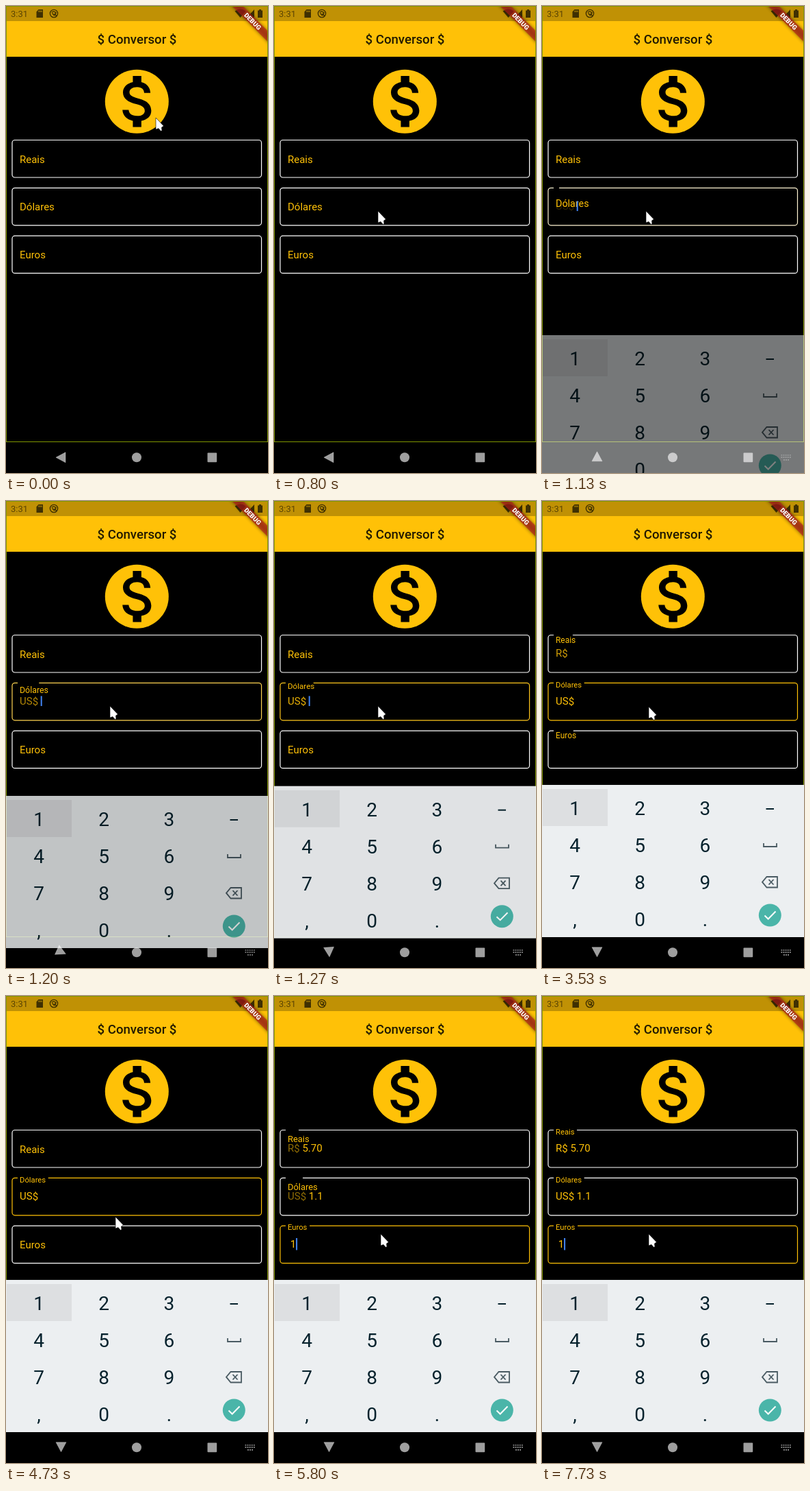
Animation, 383 px wide and 681 px high, one loop 8 s. Source, as an HTML page:

```html
<!DOCTYPE html>
<html lang="pt">
<head>
<meta charset="utf-8">
<title>Conversor</title>
<style>
  html, body { margin: 0; width: 100%; height: 100%; overflow: hidden; background: #000; }
  svg { display: block; width: 100%; height: 100%; font-family: Roboto, Inter, sans-serif; }
  text { white-space: pre; }
  .keys text { font-size: 28px; text-anchor: middle; fill: #06222d; }
</style>
</head>
<body>
<svg viewBox="0 0 383 681">
  <rect width="383" height="681"/>
  <rect width="383" height="74" fill="#ffc107"/>
  <rect width="383" height="22" fill="#c09105"/>

  <g fill="#5a4404">
    <text x="7" y="16" font-size="13">3:31</text>
    <path fill="#3f3002" d="M47.5 5H54V17H44.500V8.500Z"/>
    <path stroke="#c09105" d="M48 6.500V9M50 6.500V9M52 6.500V9"/>
    <circle cx="70" cy="11" r="5.600" fill="none" stroke="#3f3002" stroke-width="1.400"/>
    <path fill="none" stroke="#3f3002" stroke-width="1.500" d="M67 9.500Q70 6.500 73 10L70.500 13.500 67.500 10.500M71 11L74 15"/>
    <g fill="#3f3002">
      <path d="M334.500 7.500Q342.500 1.500 350.500 7.500L342.500 17Z"/>
      <path d="M363 5V17H352Z"/>
      <path d="M368 6.500H370V5H373V6.500H375V17H368Z"/>
    </g>
  </g>

  <text x="191.500" y="55" font-size="18.600" font-weight="500" text-anchor="middle" fill="#211900">$ Conversor $</text>

  <circle cx="191.300" cy="139.200" r="46.500" fill="#ffc107"/>
  <path transform="translate(135.500 83.400) scale(4.650)" d="M13.410 18.090V20h-2.670v-1.930c-1.710-.36-3.160-1.460-3.270-3.400h1.960c.1 1.050.82 1.870 2.650 1.870 1.960 0 2.400-.98 2.400-1.590 0-.83-.44-1.610-2.670-2.140-2.480-.6-4.180-1.620-4.180-3.670 0-1.720 1.390-2.840 3.110-3.210V4h2.670v1.950c1.860.45 2.790 1.860 2.850 3.390H14.300c-.05-1.110-.64-1.870-2.220-1.870-1.500 0-2.400.68-2.400 1.640 0 .84.65 1.390 2.670 1.910s4.180 1.390 4.180 3.910c-.01 1.830-1.380 2.830-3.120 3.160z"/>

  <g id="fields"></g>
  <rect id="caret" width="2" fill="#4285f4"/>

  <defs><filter id="blur" x="-20%" y="-80%" width="140%" height="260%"><feGaussianBlur stdDeviation="2.500"/></filter></defs>
  <g transform="translate(383 0) rotate(45)">
    <rect x="-40" y="26" width="80" height="11.200" opacity=".5" filter="url(#blur)"/>
    <rect x="-40" y="26" width="80" height="11.200" fill="#b71c1c" fill-opacity=".63"/>
    <text y="35" font-size="9.500" font-weight="900" text-anchor="middle" fill="#fff">DEBUG</text>
  </g>
  <rect x=".5" y=".5" width="382" height="635" fill="none" stroke="#7f9600"/>

  <g id="keyboard" class="keys">
    <rect y="414" width="383" height="222" fill="#eceff1"/>
    <rect x="1" y="420" width="95" height="54" fill="#dddfe1"/>
    <g id="digits"></g>
    <path d="M327.500 449H339" stroke="#06222d" stroke-width="2"/>
    <g fill="none" stroke="#4a5b63" stroke-width="1.800">
      <path d="M324 499V504H343V499"/>
      <path d="M328.500 548H344V563.500H328.500L322 555.700Z"/>
      <path d="M331.500 552L338.500 559.500M338.500 552L331.500 559.500"/>
    </g>
    <circle cx="333.300" cy="604" r="16.500" fill="#4ab5a9"/>
    <path d="M325.500 604.500L330.700 609.500 341.500 598.500" fill="none" stroke="#fff" stroke-width="2"/>
  </g>

  <g fill="#fff" fill-opacity=".62">
    <path id="back" stroke="#fff" stroke-opacity=".3" stroke-linejoin="round" d="M-7.500 0L6.500-7.500V7.500Z"/>
    <circle cx="191" cy="658.300" r="7"/>
    <rect x="294.500" y="651.500" width="13.700" height="13.700" rx="1"/>
    <path id="imeIcon" fill="none" stroke="#fff" stroke-opacity=".62" stroke-width="1.700" stroke-dasharray="1.800 1.300" d="M349.500 655H365M349.500 658.200H365M353 661.800H362"/>
  </g>

  <path id="pointer" fill="#fff" stroke="#000" stroke-width=".6" d="M0 0V17L4 15.500 7.500 19.500 9 18.500 8.500 14 11.500 12Z"/>
</svg>

<script>
const LOOP = 8000, RATE = 15;
const NS = "http://www.w3.org/2000/svg";
const byId = id => document.getElementById(id);
const mix = (a, b, p) => a + (b - a) * p;

function add(parent, tag, attrs = {}, text = "") {
  const node = document.createElementNS(NS, tag);
  set(node, attrs);
  node.textContent = text;
  return parent.appendChild(node);
}
function set(node, attrs) {
  for (const key in attrs) node.setAttribute(key, attrs[key]);
}

// Moments in ticks of 1/15 s
const FOCUS_USD = 17, TYPE_USD = 30, CLEAR_USD = 53, FOCUS_EUR = 78, TYPE_EUR = 86;
const CARET_ON = [[17, 24], [30, 37], [44, 52], [60, 67], [78, 85], [86, 93], [101, 109], [116, 120]];
const POINTER = [[2, 219, 163], [12, 152, 299], [41, 152, 299], [42, 154, 299], [43, 154, 299], [44, 156, 300],
                 [69, 156, 300], [70, 158, 309], [71, 160, 322], [75, 156, 347]];
const FOCUS_EASE = [.18, .7, .91, 1];
const TYPE_EASE = [.06, .56, .88, 1];

const ramp = (tick, start, steps) => tick < start ? 0 : steps[Math.min(tick - start, steps.length - 1)];

function makeField(name, prefix, top, labelWidth) {
  const group = add(byId("fields"), "g");
  const border = add(group, "path", { fill: "none", "stroke-width": 1.2 });
  const label = add(group, "text", { x: 20, fill: "#ffc107" }, name);
  const line = add(group, "text", { x: 20, y: top + 31.5, "font-size": 15, fill: "#ffc107" });
  const lead = add(line, "tspan", {}, prefix);
  const value = add(line, "tspan");
  return (lift, focus, text) => {
    const gapEnd = 17 + lift * (labelWidth + 6.5);
    set(border, {
      d: `M${gapEnd} ${top}H369.500a4 4 0 0 1 4 4v46.500a4 4 0 0 1-4 4H13a4 4 0 0 1-4-4V${top + 4}a4 4 0 0 1 4-4H17`,
      stroke: `rgb(255,${mix(255, 193, focus)},${mix(255, 7, focus)})`
    });
    set(label, { y: top + mix(33, 6.2, lift), "font-size": mix(15, 11.25, lift) });
    set(lead, { "fill-opacity": lift });
    value.textContent = text;
  };
}

const reais = makeField("Reais", "R$ ", 195.5, 27.5);
const dolares = makeField("Dólares", "US$ ", 265.3, 38.2);
const euros = makeField("Euros", " ", 335.2, 28.6);

["123", "456", "789", ",0."].forEach((row, r) =>
  [...row].forEach((key, c) => add(byId("digits"), "text", { x: 48 + c * 95.2, y: 458 + r * 54 }, key)));

function pointerAt(tick) {
  const next = POINTER.findIndex(p => p[0] > tick);
  if (next < 0) return POINTER[POINTER.length - 1].slice(1);
  if (next === 0) return POINTER[0].slice(1);
  const [t0, x0, y0] = POINTER[next - 1], [t1, x1, y1] = POINTER[next];
  const u = (tick - t0) / (t1 - t0), p = u * u * (3 - 2 * u);
  return [mix(x0, x1, p), mix(y0, y1, p)];
}

function drawFields(tick) {
  const usdTyped = tick >= TYPE_USD && tick < CLEAR_USD;
  const eurTyped = tick >= TYPE_EUR;
  const usdFocus = ramp(tick, FOCUS_USD, FOCUS_EASE) - ramp(tick, FOCUS_EUR, FOCUS_EASE);
  const eurFocus = ramp(tick, FOCUS_EUR, FOCUS_EASE);
  const first = ramp(tick, TYPE_USD, TYPE_EASE) - ramp(tick, CLEAR_USD, FOCUS_EASE);
  const second = ramp(tick, TYPE_EUR, TYPE_EASE);

  reais(first + second, 0, usdTyped ? "5.11" : eurTyped ? "5.70" : "");
  dolares(usdFocus + second, usdFocus, usdTyped ? "1" : eurTyped ? "1.1" : "");
  euros(first + eurFocus, eurFocus, usdTyped ? "0.90" : eurTyped ? "1" : "");

  const inEuros = tick >= FOCUS_EUR, typed = usdTyped || eurTyped;
  set(byId("caret"), {
    x: (inEuros ? 23.7 : 50.7) + (typed ? 8.4 : 0),
    y: (inEuros ? 353 : 283.2) + (typed ? 0 : 1.2),
    height: typed ? 17.5 : 14.6,
    visibility: CARET_ON.some(([a, b]) => tick >= a && tick < b) ? "visible" : "hidden"
  });
}

function drawKeyboard(tick) {
  const alpha = ramp(tick, FOCUS_USD, [.5, .82, .95, 1]);
  const drop = 66 - ramp(tick, FOCUS_USD, [0, 50, 64.3, 66]);
  const turn = ramp(tick, FOCUS_USD, [90, 205, 266, 270]);
  set(byId("keyboard"), { opacity: alpha, transform: `translate(0 ${drop})` });
  set(byId("back"), { transform: `translate(80.500 ${turn ? 657.3 : 658.3}) rotate(${turn})` });
  set(byId("imeIcon"), { opacity: alpha });
}

function draw(ms) {
  const tick = Math.floor((ms + 4) * RATE / 1000) % (LOOP * RATE / 1000);
  drawFields(tick);
  drawKeyboard(tick);
  set(byId("pointer"), { transform: `translate(${pointerAt(tick)})` });
}

const begin = performance.now();
function loop() {
  draw((performance.now() - begin) % LOOP);
  requestAnimationFrame(loop);
}
loop();
</script>
</body>
</html>
```
